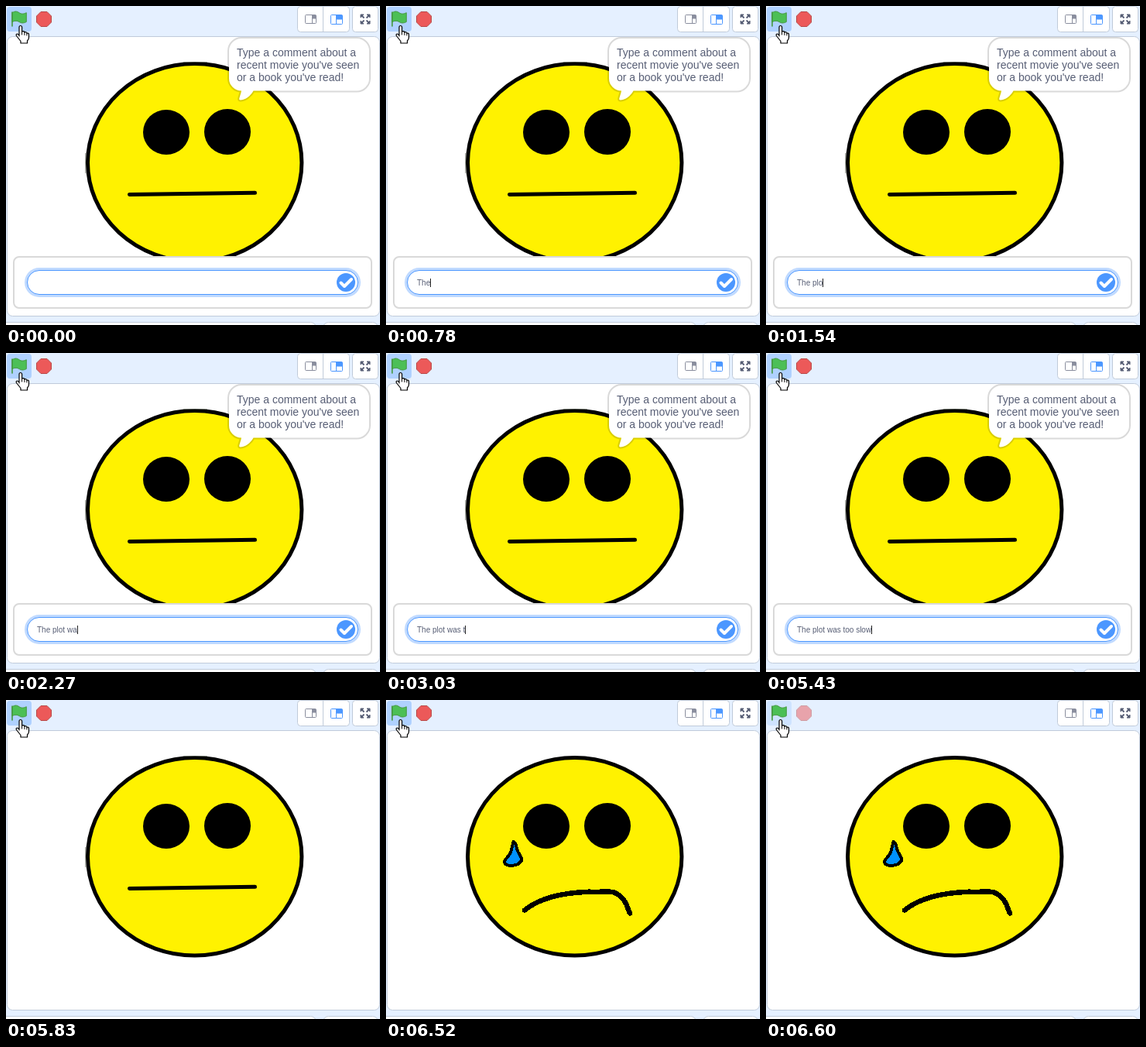
Write an HTML page that moves like this. It is 483x412 px and loops after 8000 ms.

```html
<!DOCTYPE html>
<html lang="en">
<head>
<meta charset="utf-8">
<title>Typed comment and a sad face</title>
<style>
  html, body { margin: 0; width: 100%; height: 100%; overflow: hidden; background: #e5f0ff; }
  svg { display: block; width: 483px; height: 412px; }
  text { font-family: "Liberation Sans", Arial, sans-serif; fill: #575e75; white-space: pre; }
  .panel { fill: #fff; stroke: #c0cbda; }
  .line { fill: none; stroke: #000; stroke-linecap: round; stroke-linejoin: round; }
</style>
</head>
<body>
<svg viewBox="0 0 483 412">
  <!-- toolbar -->
  <rect id="glow" x="1" y="1" width="32" height="32" rx="4"/>
  <path d="M8 8.7C12 6 14.500 7 17 8.700S22 10.800 26.300 8.700V20.500C22 22.800 19.500 22 17 20.500S12 18.600 8 20.500Z" fill="#4cbf56" stroke="#45993d" stroke-linejoin="round"/>
  <path d="M8 8V26" class="line" style="stroke:#45993d" stroke-width="1.600"/>
  <path id="stop" d="M45 7.500h8l5.500 5.500v8l-5.500 5.500h-8l-5.500-5.500v-8Z" fill="#ec5959" stroke="#b84848" stroke-linejoin="round"/>
  <rect class="panel" x="376.500" y=".5" width="67" height="33" rx="4"/>
  <path d="M409.500 1V33" stroke="#c0cbda"/>
  <g fill="none" stroke="#8a8e9e">
    <rect x="386.500" y="11.500" width="14" height="11" rx="1"/>
    <path d="M395.500 12V22"/>
    <path d="M396 12h4v4h-4Z" fill="#8a8e9e"/>
  </g>
  <g fill="none" stroke="#4c97ff">
    <rect x="419.500" y="11.500" width="15" height="12" rx="1"/>
    <path d="M426.500 12V23"/>
    <path d="M427 12h7v5h-7Z" fill="#4c97ff"/>
  </g>
  <rect class="panel" x="447.500" y=".5" width="33" height="33" rx="4"/>
  <g fill="#575e75" stroke="#575e75" stroke-width="1.800" stroke-linejoin="round">
    <path d="M458 11h4l-4 4ZM470 11v4l-4-4ZM458 23v-4l4 4ZM470 23h-4l4-4Z" stroke-width="1"/>
    <path d="M459 12l3.500 3.500M469 12l-3.500 3.500M459 22l3.500-3.500M469 22l-3.500-3.500"/>
  </g>

  <!-- stage and lower panels -->
  <rect class="panel" x="1.500" y="39.500" width="481" height="361" rx="7"/>
  <rect class="panel" x="-9.500" y="408.500" width="410" height="30" rx="7"/>
  <rect class="panel" x="409.500" y="408.500" width="71" height="30" rx="7"/>

  <!-- face -->
  <ellipse cx="243.700" cy="202.300" rx="138.200" ry="127.700" fill="#fff200" stroke="#000" stroke-width="5"/>
  <ellipse cx="207" cy="163" rx="30" ry="29"/>
  <ellipse cx="286" cy="162.500" rx="30" ry="29.500"/>
  <g id="calm">
    <path d="M229 72.500H260M102.500 190V216" stroke="#778070" opacity=".6"/>
    <path class="line" d="M159.500 243.500L321.500 241.200" stroke-width="5"/>
  </g>
  <g id="sad" shape-rendering="crispEdges">
    <path class="line" d="M179 271.500C199 255 228 249 262 247.700C282 248.500 289 246 296 249C306 254 311 263 313 271L315 275.500" stroke-width="6.500"/>
    <path class="line" d="M164.500 183C169 185 168 192 171 197C174 202 176 204 175 208C172 210 172 213 165 213.500C157 214.500 153 213 153 208C155 204 160 201 161.500 195Z" stroke-width="4" style="fill:#0090ff"/>
  </g>

  <!-- question -->
  <g id="ask">
    <path d="M304 42H453a16 16 0 0 1 16 16V93.500a16 16 0 0 1-16 16H319.500C316 116 309 121.500 302.500 121.500C299.500 121 302.500 117 304 109.500A16 16 0 0 1 288 93.500V58a16 16 0 0 1 16-16Z"
      fill="#fff" stroke="#000" stroke-opacity=".15" stroke-width="4" paint-order="stroke"/>
    <g font-size="14">
      <text x="298" y="65">Type a comment about a</text>
      <text x="298" y="81">recent movie you've seen</text>
      <text x="298" y="97">or a book you've read!</text>
    </g>
    <rect x="10" y="324" width="462" height="66" rx="7" fill="#fff" stroke="#d9d9d9" stroke-width="2"/>
    <rect x="24" y="338" width="434" height="38" rx="19" fill="#c0daff"/>
    <rect x="27.500" y="341.500" width="427" height="31" rx="15.500" fill="#fff" stroke="#4c97ff"/>
    <text id="typed" x="40" y="361" font-size="10"></text>
    <rect id="caret" y="352" width="1" height="11" fill="#222"/>
    <circle cx="439" cy="357" r="12" fill="#4c97ff"/>
    <path class="line" d="M432.500 357.500L437 362L446 353" style="stroke:#fff" stroke-width="4"/>
  </g>

  <!-- hand pointer -->
  <path d="M17 39V27.500Q17 25.500 18.800 25.500T20.600 27.500V33Q23.300 31.800 23.900 34Q26.300 33 26.900 35.200Q29.500 34.500 29.500 37V41Q29.500 43 27.500 45V48H19V45.500L13.500 38.500Q12.500 36.500 14.300 36Q15.500 35.800 17 38Z" fill="#fff" stroke="#000" stroke-width="1.200" stroke-linejoin="round"/>
  <path d="M20.600 33V37M23.900 34V37.500M26.900 35.200V38" class="line"/>
</svg>
<script>
const LOOP = 8000, ANSWER = "The plot was too slow";
const keyTimes = [300, 610, 780, 840, 1080, 1310, 1540, 1710, 1870, 2100, 2270,
  2420, 2650, 3030, 3350, 3490, 3580, 3810, 4040, 4190, 4360];
const SENT = 5830, CRY = 6520, IDLE = 6600;
const get = id => document.getElementById(id);
const [glow, stop, calm, sad, ask, typed, caret] =
  ["glow", "stop", "calm", "sad", "ask", "typed", "caret"].map(get);
const show = (el, on) => el.style.display = on ? "" : "none";

function draw(t) {
  const count = keyTimes.filter(k => k <= t).length;
  const text = ANSWER.slice(0, count);
  if (typed.textContent !== text) typed.textContent = text;
  show(ask, t < SENT);
  show(caret, count > 0 && (t < 4970 || t >= 5430));
  if (t < SENT) caret.setAttribute("x", 40 + Math.round(typed.getComputedTextLength()));
  show(calm, t < CRY);
  show(sad, t >= CRY);
  glow.setAttribute("fill", t < IDLE ? "#afd1ff" : "#cee3ff");
  stop.setAttribute("opacity", t < IDLE ? 1 : 0.5);
}

let start;
function tick(now) {
  start ??= now;
  draw((now - start) % LOOP);
  requestAnimationFrame(tick);
}
draw(0);
requestAnimationFrame(tick);
</script>
</body>
</html>
```
